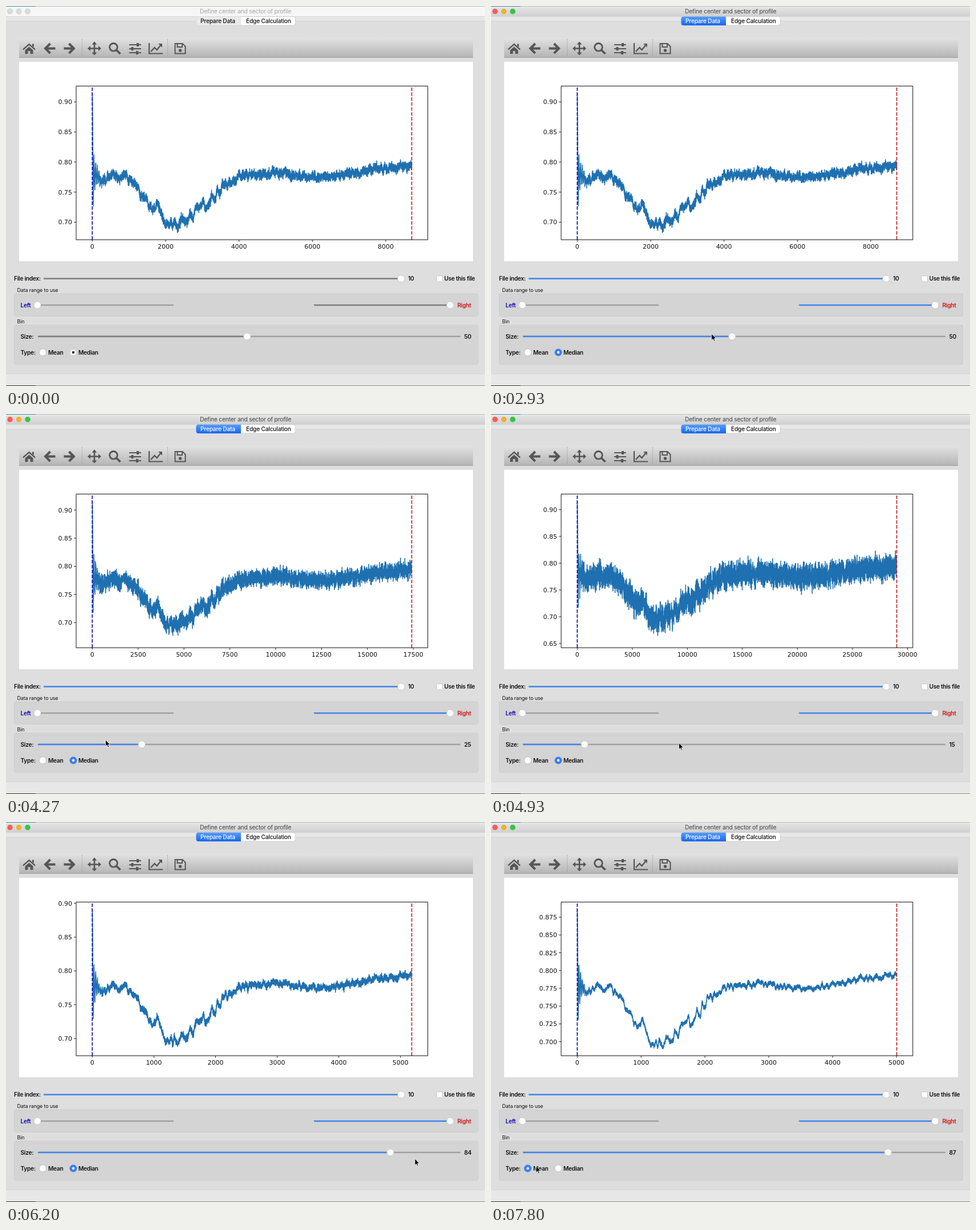
These frames come from a looping animation (840x667 px, 8 s). An HTML page:

```html
<!DOCTYPE html>
<html lang="en">
<head>
<meta charset="utf-8">
<title>Define center and sector of profile</title>
<style>
html, body { margin: 0; width: 100%; height: 100%; overflow: hidden; background: #dedede; }
svg { display: block; width: 100vw; height: 100vh; }
text { font: 600 10.2px Inter, "Open Sans", sans-serif; letter-spacing: -.3px; fill: #111; }
.small { font-size: 9px; font-weight: 400; letter-spacing: -.2px; }
.title { font-weight: 400; font-size: 10.3px; letter-spacing: -.2px; fill: #a6a6a6; }
.tabText { font-weight: 500; letter-spacing: -.2px; }
.plot text { font: 11px "DejaVu Sans", sans-serif; letter-spacing: 0; }
.bar { fill: #f6f6f6; }
.tab { fill: #e9e9e9; }
.light { fill: #dadada; stroke: #cbcbcb; stroke-width: .6; }
.track { stroke: #a0a0a0; stroke-width: 2.4; stroke-linecap: round; }
.fill { stroke: #7d7d7d; }
.knob { fill: #fff; stroke: #b3b3b3; stroke-width: .7; }
.dot { display: none; fill: #222; }
.sel .dot { display: inline; }
.press .knob { fill: #dcdcdc; }
.icon { fill: none; stroke: #565656; stroke-width: 2.4; }
.icon .solid { fill: #565656; stroke: none; }
.on .title { fill: #444; }
.on .bar { fill: url(#barOn); }
.on .tab { fill: url(#tabOn); }
.on .tab + .tabText { fill: #fff; }
.on .fill { stroke: #3f82ec; }
.on .sel .knob { fill: #3880f5; stroke: #2a6cdc; }
.on .sel .dot { fill: #fff; }
.on .light { stroke: none; fill: var(--c); }
</style>
</head>
<body>
<svg id="ui" viewBox="0 0 840 667" preserveAspectRatio="none">
  <defs>
    <linearGradient id="barOn" x2="0" y2="1"><stop stop-color="#e6e6e6"/><stop offset="1" stop-color="#d0d0d0"/></linearGradient>
    <linearGradient id="tabOn" x2="0" y2="1"><stop stop-color="#5b9df9"/><stop offset="1" stop-color="#1466f2"/></linearGradient>
    <linearGradient id="tools" x2="0" y2="1"><stop stop-color="#e2e2e2"/><stop offset="1" stop-color="#b5b5b5"/></linearGradient>
    <clipPath id="axes"><path d="M123 140H740V410H123Z"/></clipPath>
  </defs>

  <!-- window -->
  <path fill="#e7e7e7" d="M0 0H840V667H0Z"/>
  <path fill="#dedede" stroke="#d2d2d2" d="M-1 26.5H841V645.5H-1Z"/>
  <path class="bar" d="M0 1H840V18H0Z"/>
  <path fill="#cfcfcf" d="M0 18H840V18.7H0Z"/>
  <path fill="#bdbdbd" d="M0 0H840V1H0Z"/>
  <path fill="#3b8db0" d="M0 0H52V1H0Z"/>
  <path fill="#8c8c8c" d="M0 666H840V667H0Z"/>
  <path fill="#333" d="M0 666H52V667H0Z"/>
  <circle class="light" style="--c:#fc5b57" cx="7" cy="9.5" r="4.8"/>
  <circle class="light" style="--c:#f0b02f" cx="22.5" cy="9.5" r="4.8"/>
  <circle class="light" style="--c:#33c748" cx="38" cy="9.5" r="4.8"/>
  <text class="title" x="340" y="13.2">Define center and sector of profile</text>
  <rect x="333.5" y="18.5" width="174" height="15.5" rx="4" fill="#fff" stroke="#c4c4c4" stroke-width=".8"/>
  <path class="tab" d="M412 18.5H337.5a4 4 0 0 0-4 4V30a4 4 0 0 0 4 4H412Z"/>
  <text class="tabText" x="341" y="29.8">Prepare Data</text>
  <text class="tabText" x="421" y="29.8">Edge Calculation</text>

  <!-- toolbar -->
  <path fill="url(#tools)" d="M23 56H819V90H23Z"/>
  <path fill="#a2a2a2" d="M23 90H819V91H23Z"/>
  <path stroke="#858585" stroke-dasharray="1 1.6" d="M133.5 58V89M283.5 58V89"/>
  <g class="icon">
    <path d="M30 76.3 40.5 67 51 76.3"/>
    <path class="solid" d="M33.5 77.5l7-6 7 6V84h-5v-5h-4v5h-5ZM46 66.5h2.8v6l-2.8-2.5Z"/>
    <path stroke-width="4" d="M86.5 74.5H69M77.5 66 69 74.5l8.5 8.5M101.5 74.5H119M110.5 66l8.5 8.5-8.5 8.5"/>
    <path stroke-width="2.7" d="M155 65V84M146 74.5H164"/>
    <path class="solid" d="M155 62.5l4.5 5h-9ZM155 86.5l4.5-5h-9ZM143 74.5l5-4.5v9ZM167 74.5l-5-4.5v9Z"/>
    <circle cx="188.5" cy="72.3" r="6.8" stroke-width="2.9"/>
    <path stroke-width="3.8" d="M193.8 77.5 200.5 84"/>
    <path stroke-width="2" d="M216 68H237M216 75H237M216 82H237"/>
    <path class="solid" d="M229 65h4v6h-4ZM219.5 72h4v6h-4ZM228 79h4v6h-4Z"/>
    <path stroke-width="2.2" d="M251 65V83.5H275"/>
    <path d="M254 80l6.5-7 4 4 7.5-9"/>
    <path class="solid" d="M267 66h6.8v6.8Z"/>
    <path stroke-width="2" d="M296.5 66H309.5L314.5 71V83.5H296.5ZM300.5 66V72H309V66"/>
    <circle class="solid" cx="305.5" cy="78" r="2.7"/>
  </g>

  <!-- figure -->
  <path fill="#fff" d="M23 98H819V448H23Z"/>
  <g class="plot">
    <path id="curve" clip-path="url(#axes)" fill="none" stroke="#1f70b0" stroke-width="1.6" stroke-linejoin="round"/>
    <g stroke-width="1.7" stroke-dasharray="6.1 2.6">
      <path stroke="#0c0cc4" d="M151.3 410V140"/>
      <path stroke="#c42020" d="M711.5 410V140"/>
    </g>
    <path fill="none" stroke="#111" d="M123 140.5H739.7V410.3H123Z"/>
    <g id="ticks" stroke-width=".9"></g>
  </g>

  <!-- controls -->
  <g fill="#d4d4d4" stroke="#cbcbcb">
    <rect x="14.5" y="505" width="813" height="39.5" rx="3"/>
    <rect x="14.5" y="560" width="813" height="69" rx="3"/>
  </g>
  <text x="14" y="482.2">File index:</text>
  <path class="track fill" d="M67 478.5H693"/>
  <circle class="knob" cx="693" cy="478.5" r="6.2"/>
  <text x="705" y="482.2">10</text>
  <rect class="knob" x="755" y="473.5" width="10.5" height="10.5" rx="2"/>
  <text x="768.5" y="482.2">Use this file</text>
  <text class="small" x="19.5" y="502">Data range to use</text>
  <text x="25.5" y="528.7" style="fill:#0a0ab4">Left</text>
  <path class="track" d="M55 525H293"/>
  <circle class="knob" cx="55" cy="525" r="6.2"/>
  <path class="track fill" d="M541 525H779"/>
  <circle class="knob" cx="779" cy="525" r="6.2"/>
  <text x="791.5" y="528.7" style="fill:#d01414">Right</text>
  <text class="small" x="19.5" y="557">Bin</text>
  <text x="25.5" y="583.7">Size:</text>
  <path class="track" d="M57 580H796"/>
  <path class="track fill" id="sizeFill"/>
  <circle class="knob" id="sizeKnob" cy="580" r="6.2"/>
  <text id="size" x="803.5" y="583.7"></text>
  <text x="25.5" y="611.5">Type:</text>
  <g id="mean"><circle class="knob" cx="64.5" cy="608" r="6.1"/><circle class="dot" cx="64.5" cy="608" r="2.2"/></g>
  <text x="74" y="611.7">Mean</text>
  <g id="median"><circle class="knob" cx="118" cy="608" r="6.1"/><circle class="dot" cx="118" cy="608" r="2.2"/></g>
  <text x="127" y="611.7">Median</text>

  <path id="cursor" d="M0 0V11.5L2.6 9 4.4 13 6.2 12.3 4.5 8.4H8Z" stroke="#fff" stroke-width=".8"/>
</svg>
<script>
const LOOP = 8000, STEP = 1000 / 15, SAMPLES = 435400, WIDTH = 560.2;
const $ = id => document.getElementById(id);

// stops of the pointer: time, x, y
const stops = [[200, 762, 340], [530, 277, 528], [670, 277, 528], [1070, 157, 594], [1670, 424, 577], [2600, 424, 577],
  [3200, 357, 574], [4270, 174, 572], [4600, 170, 573], [5070, 395, 579], [5470, 506, 582], [5800, 675, 587],
  [6200, 717, 591], [6930, 232, 626], [7330, 79, 604]];

function pointer(t) {
  const i = stops.findIndex(s => s[0] > t);
  if (i < 1) return (i ? stops[stops.length - 1] : stops[0]).slice(1);
  const [t0, x0, y0] = stops[i - 1], [t1, x1, y1] = stops[i], f = (t - t0) / (t1 - t0);
  return [x0 + (x1 - x0) * f, y0 + (y1 - y0) * f];
}

// the slider trails the dragging pointer
const knobX = bin => 238 + 7.39 * (bin - 25);
function binAt(t) {
  const [x] = pointer(Math.min(6100, Math.max(2600, t - 400)));
  return Math.min(87, Math.floor(25 + (x - 238) / 7.39));
}

const ease = (x, a, b) => { const f = Math.min(1, Math.max(0, (x - a) / (b - a))); return f * f * (3 - 2 * f); };
const bump = (x, mid, w) => Math.exp(-(((x - mid) / w) ** 2));
const rand = n => { const s = Math.sin(n * 127.1 + 3.7) * 43758.5453; return 2 * (s - Math.floor(s)) - 1; };
function slowNoise(x) {
  const i = Math.floor(x);
  return rand(i) + (rand(i + 1) - rand(i)) * ease(x, i, i + 1);
}

// x: pixels from the left marker
function profile(x) {
  const trend = .775 - .077 * ease(x, 55, 132) + .022 * bump(x, 115, 7) + .08 * ease(x, 145, 270)
    + .003 * Math.cos((x - 320) / 24) * ease(x, 250, 300) + .019 * ease(x, 440, 560);
  const wiggle = .004 + .009 * bump(x, 195, 42) + .004 * Math.exp(-x / 50);
  return trend + wiggle * slowNoise(x / 3) + .055 * Math.exp(-x / 5) * Math.cos(x * 2.1);
}

function valueRange(bin, mean) {
  if (mean) return [.6902, .8866];
  const b = Math.min(bin, 84);
  return [.6851 - .0172 * ((84 - b) / 59) ** 3.5, .9162 - .0246 * (Math.max(0, b - 40) / 44) ** 2];
}

function tickStep(span) {
  const raw = span / 9, mag = 10 ** Math.floor(Math.log10(raw));
  return [1, 2, 2.5, 5, 10].find(m => m * mag >= raw) * mag;
}

function drawPlot(bin, mean) {
  const n = SAMPLES / bin, [lo, hi] = valueRange(bin, mean);
  const px = x => 151.3 + x / n * WIDTH, py = v => 152.6 + (hi - v) * 245.2 / (hi - lo);
  const grain = mean ? .003 : .0077 * (50 / bin) ** .9;

  let d = "M151.3 " + py(hi);
  for (let i = 1; i <= WIDTH * 10; i++) {
    const x = i / 10, seed = bin * 20000 + i * 3;
    let v = profile(x) + grain * (rand(seed) + rand(seed + 1) + rand(seed + 2)) / 2;
    if (x < 1.5) v += (hi - v) * (1 - x / 1.5);
    d += `L${(151.3 + x).toFixed(1)} ${py(Math.max(lo, Math.min(hi, v))).toFixed(1)}`;
  }
  $("curve").setAttribute("d", d);

  let marks = "";
  const dx = tickStep(n * 1.1), dy = tickStep((hi - lo) * 1.1);
  for (let x = 0; px(x) < 740; x += dx)
    marks += `<path stroke="#111" d="M${px(x)} 410v4"/><text text-anchor="middle" x="${px(x)}" y="426.3">${x}</text>`;
  for (let k = Math.ceil(.6 / dy); k * dy < 1; k++) {
    const y = py(k * dy);
    if (y < 140 || y > 410) continue;
    marks += `<path stroke="#111" d="M123 ${y}h-4"/><text text-anchor="end" x="116" y="${y + 4}">${(k * dy).toFixed(dy < .03 ? 3 : 2)}</text>`;
  }
  $("ticks").innerHTML = marks;
}

let shown = "";
function render(t) {
  const bin = binAt(t), mean = t >= 7790, key = bin + "," + mean;
  $("ui").classList.toggle("on", t >= 2660);
  $("mean").classList.toggle("sel", mean);
  $("mean").classList.toggle("press", t >= 7590 && !mean);
  $("median").classList.toggle("sel", !mean);
  $("cursor").style.display = t >= 195 ? "" : "none";
  $("cursor").setAttribute("transform", `translate(${pointer(t)})`);
  if (key === shown) return;
  shown = key;
  $("sizeFill").setAttribute("d", `M57 580H${knobX(bin)}`);
  $("sizeKnob").setAttribute("cx", knobX(bin));
  $("size").textContent = bin;
  drawPlot(bin, mean);
}

function frame() {
  const t = performance.now() % LOOP;
  render(Math.floor((t + 4) / STEP) * STEP);
  requestAnimationFrame(frame);
}
frame();
</script>
</body>
</html>
```
